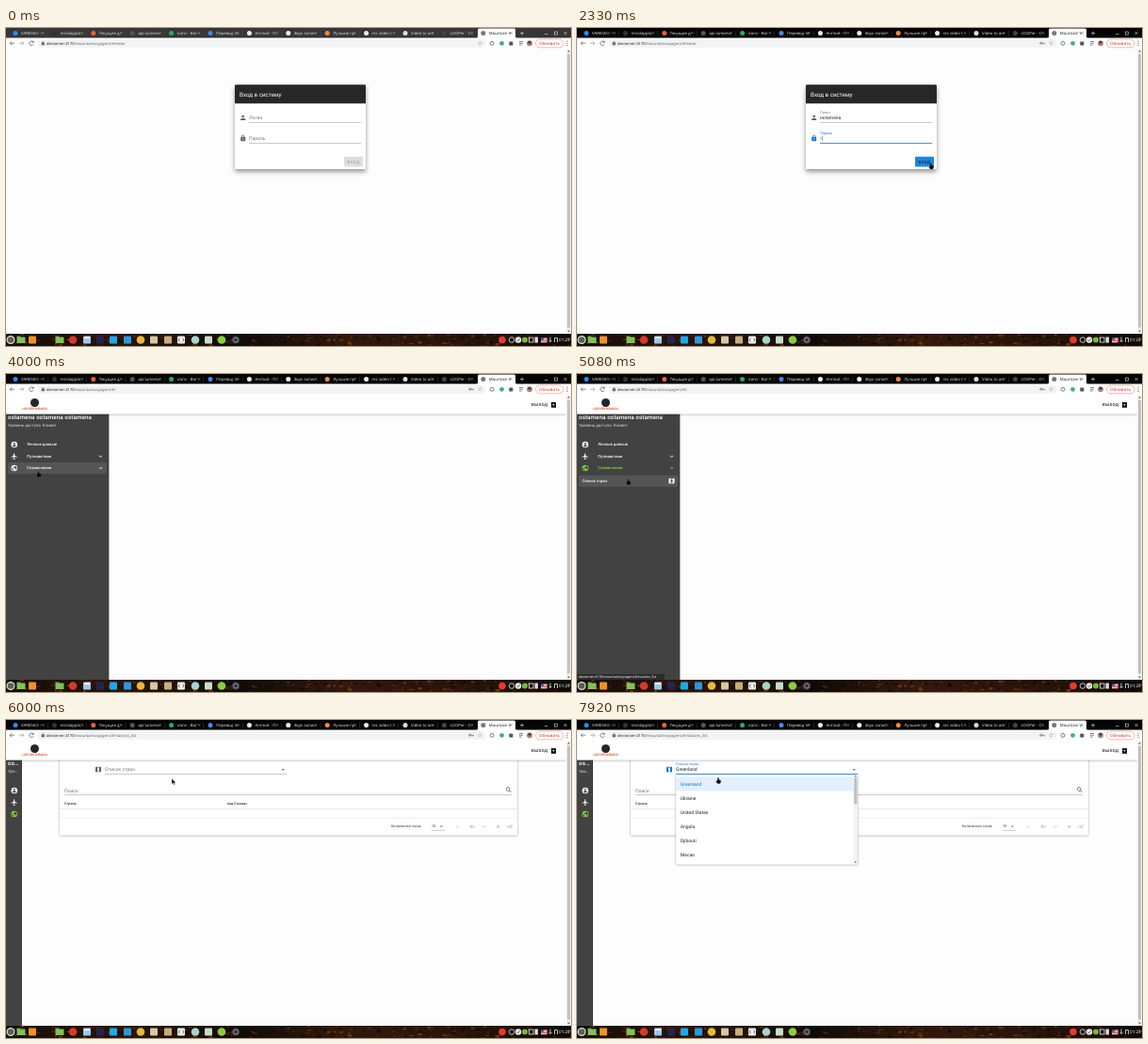
Animation, 600 px wide and 338 px high, one loop 8 s. Source, as an HTML page:

```html
<!DOCTYPE html>
<html lang="ru">
<head>
<meta charset="utf-8">
<title>Экран</title>
<style>
  html, body { margin: 0; width: 100%; height: 100%; overflow: hidden; background: #fdfdfd; }
  svg { display: block; }
  text { text-rendering: geometricPrecision; white-space: pre; }
  .ui { font-family: "Noto Sans", "Open Sans", sans-serif; }
  .app { font-family: Roboto, sans-serif; }
</style>
</head>
<body>
<svg id="stage" width="600" height="338" viewBox="0 0 600 338">
  <defs>
    <filter id="shadow" x="-20%" y="-20%" width="140%" height="150%">
      <feDropShadow dx="0" dy="2.8" stdDeviation="2.6" flood-opacity=".42"/>
    </filter>
    <filter id="soft" x="-10%" y="-20%" width="120%" height="150%">
      <feDropShadow dx="0" dy=".6" stdDeviation=".8" flood-opacity=".38"/>
    </filter>
    <linearGradient id="leaves">
      <stop offset="0" stop-color="#120c0a"/><stop offset=".2" stop-color="#2c150b"/>
      <stop offset=".42" stop-color="#0f0b09"/><stop offset=".6" stop-color="#33190c"/>
      <stop offset=".85" stop-color="#25130a"/><stop offset="1" stop-color="#0c0908"/>
    </linearGradient>
  </defs>
  <g id="page" class="app"></g>
  <g id="frame" class="ui"></g>
  <g id="top" class="ui"></g>
</svg>
<script>
const LOOP = 8000, STEP = 1000 / 12;
const BLUE = '#1976d2', LIME = '#8bd836', INK = '#222', GREY = '#757575';
const USER = 'ostamena', HOST = 'devserver:4170', ROOT = '/mountainvoyagers/#/';
const $ = id => document.getElementById(id);

const clamp = v => Math.max(0, Math.min(1, v));
const ease = v => v * v * (3 - 2 * v);
const ramp = (t, from, dur) => ease(clamp((t - from) / dur));
const mix = (a, b, k) => a + (b - a) * k;

const rect = (x, y, w, h, fill, more = '') =>
  `<rect x="${x}" y="${y}" width="${w}" height="${h}" fill="${fill}" ${more}/>`;
const dot = (x, y, r, fill, more = '') => `<circle cx="${x}" cy="${y}" r="${r}" fill="${fill}" ${more}/>`;
const text = (x, y, s, size, fill = INK, more = '') =>
  `<text x="${x}" y="${y}" font-size="${size}" fill="${fill}" ${more}>${s}</text>`;
const line = (d, color, w = .7) => `<path d="${d}" fill="none" stroke="${color}" stroke-width="${w}"/>`;
const clip = (x, y, w, h, body) => `<svg x="${x}" y="${y}" width="${w}" height="${h}" overflow="hidden">${body}</svg>`;
const MEDIUM = 'font-weight="500"', BOLD = 'font-weight="700"';

const ICONS = {
  person: 'M12 12a4 4 0 1 0 0-8 4 4 0 0 0 0 8zm0 2c-3 0-8 1.5-8 4v2h16v-2c0-2.5-5-4-8-4z',
  lock: 'M18 8h-1V6A5 5 0 0 0 7 6v2H6a2 2 0 0 0-2 2v10c0 1.1.9 2 2 2h12a2 2 0 0 0 2-2V10a2 2 0 0 0-2-2zm-6 9a2 2 0 1 1 0-4 2 2 0 0 1 0 4zm3-9H9V6a3 3 0 0 1 6 0z',
  account: 'M12 2a10 10 0 1 0 0 20 10 10 0 0 0 0-20zm0 3a3 3 0 1 1 0 6 3 3 0 0 1 0-6zm0 14.2a7.2 7.2 0 0 1-6-3.2c0-2 4-3.1 6-3.1s6 1.1 6 3.1a7.2 7.2 0 0 1-6 3.2z',
  plane: 'M21 16v-2l-8-5V3.5a1.5 1.5 0 0 0-3 0V9l-8 5v2l8-2.5V19l-2 1.5V22l3.5-1 3.5 1v-1.5L13 19v-5.5z',
  earth: 'M17.9 17.4c-.3-.8-1-1.4-1.9-1.4h-1v-3a1 1 0 0 0-1-1H8v-2h2a1 1 0 0 0 1-1V7h2a2 2 0 0 0 2-2v-.4a8 8 0 0 1 2.9 12.8zM11 19.9C7 19.4 4 16.1 4 12c0-.6.1-1.2.2-1.8L9 15v1a2 2 0 0 0 2 2zM12 2a10 10 0 1 0 0 20 10 10 0 0 0 0-20z',
  map: 'M15 5L9 3 3 5v16l6-2 6 2 6-2V3zm0 14l-6-2V5l6 2z',
  search: 'M9.5 3a6.5 6.5 0 1 0 4.2 11.5l5.3 5.5 1.5-1.5-5.5-5.3A6.5 6.5 0 0 0 9.5 3zm0 2a4.5 4.5 0 1 1 0 9 4.5 4.5 0 0 1 0-9z',
  chevron: 'M7.4 8.6L12 13.2l4.6-4.6L18 10l-6 6-6-6z',
  caret: 'M7 10l5 5 5-5z',
  exit: 'M4 3h16v18H4zM11 8l4 4-4 4v-3H7v-2h4z'
};
const icon = (name, x, y, fill, size = 8, turn = 0) =>
  `<path d="${ICONS[name]}" fill="${fill}" fill-rule="evenodd" transform="translate(${x} ${y}) rotate(${turn}) scale(${size / 24}) translate(-12 -12)"/>`;

const POINTERS = {
  arrow: '<path d="M0 0v6.4l1.5-1.3 1 2.2 1-.5-1-2.1h2z" fill="#111" stroke="#fff" stroke-width=".4"/>',
  hand: '<path d="M-.6 0h1.1v2l2.1.6v2l-.6 1.3h-2.9l-1.5-2.2.6-.5.6.6z" fill="#000" stroke="#555" stroke-width=".3"/>',
  beam: '<path d="M-1.2-3h2.4M0-3v6M-1.2 3h2.4" fill="none" stroke="#111" stroke-width=".7"/>'
};
const PATH = [
  [0, 244, 342, 'arrow'], [250, 248, 330, 'arrow'], [820, 303, 99, 'beam'], [1000, 305, 96, 'beam'],
  [1670, 305, 96, 'beam'], [1830, 302, 117, 'beam'], [2060, 322, 119, 'arrow'], [2250, 376, 144, 'hand'],
  [2580, 376, 144, 'arrow'], [2830, 376, 144, 'arrow'], [3150, 230, 62, 'arrow'], [3580, 12, 40, 'arrow'],
  [3700, 14, 62, 'hand'], [3920, 34.5, 103.5, 'hand'], [4080, 34.5, 103.5, 'hand'], [4420, 36, 103, 'hand'],
  [4670, 36, 103, 'hand'], [4850, 50, 111, 'hand'], [5420, 62, 113, 'hand'], [5500, 70, 113, 'hand'],
  [5570, 112, 107, 'arrow'], [5666, 165, 98.5, 'arrow'], [6000, 176, 62, 'arrow'], [6250, 170, 54, 'hand'],
  [6420, 170, 54, 'hand'], [6750, 146.5, 73.5, 'hand'], [7170, 146.5, 73.5, 'hand'], [7600, 150, 61.5, 'hand'],
  [8001, 150, 61.5, 'hand']
];
function pointer(t) {
  const i = PATH.findIndex(p => p[0] > t) - 1;
  const [a, b] = [PATH[i], PATH[i + 1]];
  const k = ease((t - a[0]) / (b[0] - a[0]));
  return `<g transform="translate(${mix(a[1], b[1], k)} ${mix(a[2], b[2], k)})">${POINTERS[a[3]]}</g>`;
}

// Browser window and desktop panel
function browser() {
  const tabs = [
    ['#2b8df0', 'VARESKO – C'], ['#333', 'mirolapplo'], ['#e8643c', 'Текущие д'], ['#555', 'api.lumenve'],
    ['#2fa866', 'icons - Bor'], ['#4a86e8', 'Перевод те'], ['#eee', 'Англий - П'], ['#eee', 'Звук запись'],
    ['#f08a3c', 'Лучшие пр'], ['#eee', 'rec video t'], ['#ddd', 'Video to an'], ['#444', 'LOOPer - C'],
    ['#777', 'Mountain V']
  ];
  let s = rect(0, 0, 600, 11, '#000', 'id="strip"') + rect(0, 10.5, 600, 11.5, '#fff') +
    '<path d="M499 11q2 0 2-2V2q0-1.500 1.500-1.500h37q1.500 0 1.500 1.500v7q0 2 2 2z" fill="#fff"/>';
  tabs.forEach(([color, title], i) => {
    const x = 10 + i * 41.4, on = i === 12, ink = on ? '#222' : '#ddd';
    s += dot(x, 5.5, 2.5, color) + clip(x + 5, 0, 24, 11, text(1, 7, title, 4.3, ink)) +
      line(`M${x + 28.2} 4.200l2.400 2.400m0-2.400l-2.400 2.400`, on ? '#444' : '#bbb', .5);
    if (i < 11) s += rect(x + 34, 3, .4, 5, '#555');
  });
  s += line('M546 5.500h4m-2-2v4M572 6.500h3.500M592.500 4l3 3m0-3l-3 3', '#ddd', .6) +
    rect(582.5, 4, 3, 3, 'none', 'stroke="#ddd" stroke-width=".6"');
  s += line('M9 16.200H4.200m2-2l-2 2 2 2', '#555') + line('M14 16.200h4.800m-2-2l2 2-2 2', '#999') +
    line('M29 15a2.300 2.300 0 1 0 .2 2.200M29.200 13.500v1.800h-1.800', '#555') +
    rect(33.5, 12, 476, 8.8, '#f1f3f4', 'rx="4.400"') + icon('lock', 39.3, 16.2, '#666', 5) +
    text(503.5, 18.3, '☆', 6, '#555', 'text-anchor="middle" font-family="DejaVu Sans, sans-serif"');
  s += dot(516, 16.3, 2, '#f4f4f4', 'stroke="#666" stroke-width=".8"') + dot(526.5, 16.3, 2.4, '#3fb27f') +
    rect(534.3, 14.6, 4, 4, '#555', 'rx=".7"') + line('M545 14.500h4M545 16.300h4M545 18.100h2.500', '#555') +
    dot(556, 16.3, 3, '#a58474') + dot(556, 15.3, 1.2, '#382721') +
    rect(562.5, 12, 29.5, 8.8, '#fff', 'rx="4.400" stroke="#e2877f" stroke-width=".6"') +
    text(566, 18, 'Обновить', 4.5, '#d93025', MEDIUM) +
    [14.2, 16.3, 18.4].map(y => dot(596, y, .6, '#d93025')).join('');
  s += rect(595, 22, 5, 303, '#f4f4f4') + rect(596, 27.5, 3, 291, '#c2c2c2') +
    '<path d="M596 25.500l1.500-2 1.500 2zM596 321.500l1.500 2 1.500-2z" fill="#666"/>';
  return s;
}

function taskbar() {
  let seed = 11;
  const rnd = () => (seed = seed * 16807 % 2147483647) / 2147483647;
  const hues = ['#552810', '#7d4216', '#1c0f09', '#0a0807', '#3c1a0c', '#0d0a08'];
  let s = rect(0, 0, 600, 13, 'url(#leaves)');
  for (let i = 0; i < 320; i++)
    s += `<ellipse cx="${rnd() * 600}" cy="${rnd() * 13}" rx="${.6 + rnd() * 2.4}" ry="${.4 + rnd() * 1.2}" fill="${hues[rnd() * 6 | 0]}" opacity=".7"/>`;
  s += dot(5, 6.5, 4.5, '#dfe5d8') + dot(5, 6.5, 3.3, '#5a6152');
  for (const x of [16, 57]) s += rect(x - 4.5, 2.5, 4, 2, '#69a844') + rect(x - 4.5, 3.5, 9, 6.5, '#82c058', 'rx=".6"');
  const apps = [
    [28, '#f0902e', 1], [71, '#d43a2a', 0], [86, '#9cc8ee', 1], [100, '#26244c', 1], [114, '#1ea8e8', 1],
    [129, '#2f96d8', 1], [143, '#e6b93c', 0], [157, '#d8c6a4', 1], [172, '#c8ad80', 1], [186, '#f2f2ee', 1],
    [201, '#a6d4cc', 0], [215, '#c8dcca', 1], [229, '#8dcc3e', 0], [244, '#34343a', 0]
  ];
  for (const [x, color, square] of apps)
    s += square ? rect(x - 4, 2.5, 8, 8, color, 'rx="1"') : dot(x, 6.5, 4.3, color);
  s += rect(83, 3, 6, 2, '#f4f8fb') + line('M184.500 5l-1.600 1.500 1.600 1.500M187.500 5l1.600 1.500-1.600 1.500', '#222', .8) +
    dot(244, 6.5, 2.6, 'none', 'stroke="#ccc" stroke-width=".6"');
  s += dot(527, 6.5, 3.8, '#e23b2e') + dot(537, 6.5, 2.8, '#111', 'stroke="#eee" stroke-width=".8"') +
    dot(544, 6.5, 3.2, '#eee') + line('M542.500 6.500l1.200 1.300 2-2.600', '#222', .7) +
    dot(551, 6.5, 3, '#78b846') + rect(555.5, 4, 4.5, 5, 'none', 'stroke="#eee" stroke-width=".8"') +
    rect(561.5, 3.5, 3.4, 6, '#ddd') + rect(568, 4, 6.5, 5, '#f4f0f0');
  for (let y = 4; y < 9; y += 1.6) s += rect(568, y, 6.5, .8, '#c63b42');
  s += rect(568, 4, 3, 2.6, '#34508c') + line('M578 3.500v5m-1.500-1.500l1.500 1.500 1.500-1.500M582.500 9V4.500h3V9', '#eee', .8) +
    text(587, 8.2, '01:23', 4.6, '#fff', MEDIUM);
  return clip(0, 325, 600, 13, s);
}

// Text field whose label floats up by k
function field(x, y, w, label, k, color, value = '') {
  const hot = color === BLUE;
  return text(x, mix(y, y - 6.4, k), label, mix(5, 3.75, k), hot ? BLUE : GREY) + text(x, y, value, 5) +
    rect(x, y + (hot ? 3 : 3.2), w, hot ? .8 : .45, hot ? BLUE : '#888');
}

function login(t) {
  const inLogin = t >= 1000 && t < 1830, inPass = t >= 1830;
  const typed = USER.slice(0, Math.round(8 * clamp((t - 1300) / 330)));
  const ready = t >= 2080, pressed = t >= 2250;
  let s = `<g filter="url(#shadow)">${rect(243, 60.3, 139, 89.7, '#fff', 'rx="1.200"')}</g>` +
    '<path d="M243 80.300V61.500q0-1.200 1.200-1.200h136.600q1.200 0 1.200 1.200V80.300z" fill="#272727"/>' +
    text(248, 72.7, 'Вход в систему', 6.25, '#fff') +
    icon('person', 251.7, 95.3, inLogin ? BLUE : '#616161') +
    icon('lock', 251.7, 117, inPass ? BLUE : '#616161', 7.5) +
    field(258, 97, 119, 'Логин', ramp(t, 1000, 160), inLogin ? BLUE : GREY, typed) +
    field(258, 119, 119, 'Пароль', ramp(t, 1830, 160), inPass ? BLUE : GREY, ready ? '•' : '');
  if (inLogin) s += rect(258 + typed.length * 2.8, 92.3, .4, 5.5, '#222');
  if (inPass) s += rect(ready ? 260.5 : 258, 114.3, .4, 5.5, '#222');
  s += rect(359, 136.7, 20, 10.8, pressed ? '#1d86dc' : ready ? '#2196f3' : '#dedede', 'rx="1"') +
    text(362.6, 143.7, 'ВХОД', 4.375, ready ? '#102a40' : '#a6a6a6', MEDIUM + ' letter-spacing=".3"');
  if (t >= 1080 && t < 1320) {
    const names = ['topkeeper', 'lio', 'velnik@pol.example', 'guard', 'dur', 'velnik77@pol.example'];
    s += `<g filter="url(#soft)" class="ui">${rect(258, 101, 119, 72, '#fff', 'rx=".8"')}` +
      names.map((n, i) => text(262, 109.8 + i * 11.3, n, 4.2, INK, MEDIUM)).join('') + '</g>';
  }
  return s;
}

function header() {
  return `<g filter="url(#soft)">${rect(0, 22, 595, 20.3, '#fff')}</g>` + dot(30.5, 30.5, 4.5, '#23252d') +
    text(30.5, 38.3, 'LORVEN MIRADA', 3.4, '#e0613a', BOLD + ' text-anchor="middle"') +
    text(558, 34.4, 'ВЫХОД', 4.375, INK, MEDIUM + ' letter-spacing=".4"') + icon('exit', 581.5, 32.8, '#111', 7.6);
}

function sidebar(t) {
  const w = mix(17, 109.4, ramp(t, 3630, 200) - ramp(t, 5720, 220));
  const mini = w < 25, open = ramp(t, 4160, 200);
  const hue = t >= 4160 ? LIME : '#fff';
  const row = (y, name, label, color = '#fff') =>
    icon(name, 8.8, y, color) + (mini ? '' : text(22.3, y + 1.4, label, 4.15, color, MEDIUM));
  let s = rect(0, 0, 110, 283, '#424242');
  if (t >= 3880 && t < 4700) s += rect(2, 51.8, 105, 12, '#555', 'rx="1"');
  s += text(2, 6.1, mini ? USER.slice(0, 2) + '…' : `${USER} ${USER} ${USER}`, 6.25, '#fff', MEDIUM + ' letter-spacing=".08"') +
    text(2, 13.5, mini ? 'Уро…' : 'Уровень доступа: Клиент', 4.375, '#ddd') +
    row(32.7, 'account', 'Личные данные') + row(45.2, 'plane', 'Путешествие') + row(57.7, 'earth', 'Справочники', hue);
  if (!mini) {
    s += icon('chevron', 100.5, 45.2, '#fff', 7.5) + icon('chevron', 100.5, 57.7, hue, 7.5, 180 * open);
    const chosen = t >= 5500, hover = t >= 4750;
    const ink = chosen ? '#4caf50' : '#fff';
    s += clip(0, 64.8, 110, Math.max(.01, 13 * open),
      rect(2, .6, 105, 12, chosen ? '#4f6650' : hover ? '#555' : '#424242', 'rx="1"') +
      text(5.5, 8.1, 'Список стран', 4.15, ink, MEDIUM) + icon('map', 100.5, 6.6, chosen ? LIME : ink));
  }
  return clip(0, 42.3, w, 282.7, s);
}

function countries(t) {
  const hot = t >= 6417, k = ramp(t, 6417, 160), picked = t >= 7700;
  let s = `<g filter="url(#soft)">${rect(57, 40, 486, 82.2, '#fff', 'rx="1"')}</g>` +
    icon('map', 98, 52.6, hot ? BLUE : '#616161') +
    field(105, 54.2, 193, 'Список стран', k, hot ? BLUE : GREY, picked ? 'Greenland' : '') +
    icon('caret', 294.3, 52.7, hot ? BLUE : '#616161', 8) +
    text(62, 76.6, 'Поиск', 5, GREY) + rect(62, 79.5, 475, .45, '#888') + icon('search', 533.8, 74.3, '#616161') +
    text(62, 90.2, 'Страна', 3.75, '#333', MEDIUM) + text(235, 90.2, 'код Страны', 3.75, '#333', MEDIUM) +
    rect(57, 94, 486, .4, '#ccc') + rect(57, 103.8, 486, .4, '#d5d5d5') +
    text(409, 114.4, 'Количество строк', 3.75, '#333') + text(452, 114.4, '10', 3.75, '#333') +
    rect(452, 117.3, 14, .4, '#888') + icon('caret', 462.3, 113.2, '#616161', 7) +
    line('M480 111.800l-1.500 1.500 1.500 1.500M498.500 113.300h-4.500m1.800-1.800l-1.800 1.800 1.800 1.800M493.300 111v4.600M506 113.300h4', '#aaa', .6) +
    line('M520.700 113.300h4m-2-2v4M531.500 113.300h4.500m-1.800-1.800l1.800 1.800-1.800 1.800M537 111v4.600', '#aaa', .6);
  if (hot) s += menu(ramp(t, 6417, 200), t >= 6660, picked);
  return s;
}

function menu(k, hover, picked) {
  const names = ['Greenland', 'Ukraine', 'United States', 'Angola', 'Djibouti', 'Macao'];
  let s = rect(105, 58, 193, 95.3, '#fff', 'rx="1"');
  if (hover) s += rect(105, 60.5, 188.5, 15, picked ? '#e3effa' : '#f1f1f1');
  s += names.map((n, i) => text(109.7, 69.8 + i * 15, n, 5, picked && !i ? BLUE : INK)).join('') +
    rect(293.6, 58, 4.4, 95.3, '#f3f3f3') + rect(294.2, 61.5, 3.2, 28, '#bfbfbf') +
    '<path d="M294.600 60.300l1.200-1.500 1.200 1.500zM294.600 150.500l1.200 1.500 1.200-1.500z" fill="#555"/>';
  return `<g filter="url(#soft)" opacity="${k}">${s}</g>`;
}

function overlay(t) {
  const route = t < 2580 ? 'enter' : t < 5500 ? '' : 'nations_list';
  let s = text(43, 17.8, `${HOST}<tspan fill="#666">${ROOT}${route}</tspan>`, 4.15);
  if (t >= 2080) s += dot(492.7, 16.2, 1, 'none', 'stroke="#555" stroke-width=".7"') + line('M493.700 16.200h2.600v1.200', '#555');
  if (t >= 4750 && t < 5750)
    s += rect(0, 319, 93, 6, '#2c2c2c') + text(1.5, 323.4, `${HOST}${ROOT}nations_list`, 3.6, '#fff', MEDIUM);
  return s + pointer(t);
}

function draw(t) {
  $('page').innerHTML = rect(0, 22, 600, 303, '#fdfdfd') +
    (t < 2580 ? login(t) : (t >= 5500 ? countries(t) : '') + sidebar(t) + header());
  // The tab strip darkens once a click focuses the window
  $('strip').setAttribute('fill', t < 1000 ? '#363636' : '#040404');
  $('top').innerHTML = overlay(t);
}

$('frame').innerHTML = browser() + taskbar();
const start = performance.now();
let last = -1;
function tick() {
  const t = (performance.now() - start) % LOOP;
  const step = Math.floor((t + 4) / STEP) % Math.round(LOOP / STEP);
  if (step !== last) draw((last = step) * STEP);
  requestAnimationFrame(tick);
}
tick();
</script>
</body>
</html>
```
